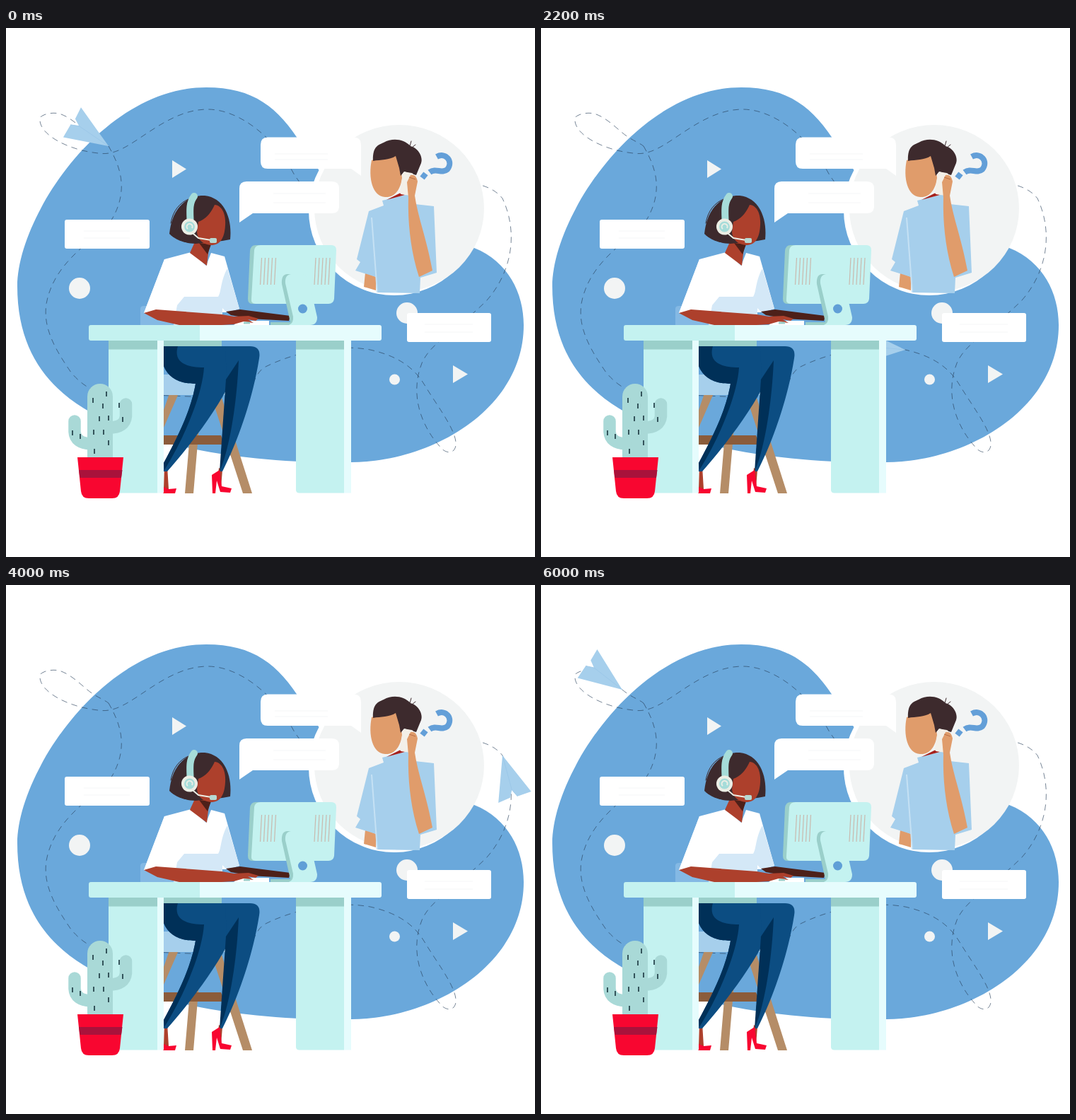
Write an HTML page that moves like this. It is 748 px wide and 748 px high and loops after 6.1 s.

```html
<!DOCTYPE html>
<html lang="en">
<head>
<meta charset="utf-8">
<title>Customer support</title>
<style>
  html, body { margin: 0; height: 100%; overflow: hidden; background: #fff; }
  svg { display: block; width: 100vw; height: 100vh; }
  .blue { fill: #6aa8db } .sky { fill: #a6cfec } .mint { fill: #c4f2f0 } .ice { fill: #e6fcfd }
  .teal { fill: #9acfca } .white { fill: #fff } .mist { fill: #f2f4f4 } .hair { fill: #3d2a2d }
  .tan { fill: #e09c6b } .skin { fill: #ad402c } .dark { fill: #4d2019 } .red { fill: #f80630 }
  .denim { fill: #0c4d82 } .navy { fill: #003058 } .wood { fill: #b58d67 } .cactus { fill: #a9d9d7 }
  .line { fill: none; stroke-linecap: round; stroke-linejoin: round }
</style>
</head>
<body>
<svg viewBox="0 0 748 748">
  <path class="blue" d="M16 365C16 268 136 84 283 84C350 84 385 112 418 165C460 235 510 270 570 285C610 290 640 300 662 311C710 330 732 375 732 420C732 540 600 614 488 614C400 616 300 606 235 588C150 562 16 525 16 365Z"/>
  <path id="route" fill="none" stroke="#263e58" stroke-width=".8" stroke-opacity=".8" stroke-dasharray="8.500 6.500"/>

  <g class="mist">
    <path d="M235 187V212L255 199.500ZM632 477V502L653 489.500Z"/>
    <circle cx="104" cy="368" r="15"/>
    <circle cx="567" cy="403" r="15"/>
    <circle cx="549.500" cy="497" r="7.500"/>
  </g>
  <g class="white">
    <rect x="83" y="271" width="120" height="41" rx="3"/>
    <rect x="567" y="403" width="119" height="41" rx="3"/>
  </g>

  <g id="plane">
    <path class="sky" d="M0 0L-62.500-24.500L-60.500-6.500L-50.500-1L-61.500 4L-60.500 24.500Z"/>
    <path d="M0 0L-50.500-1L-61.500 4" fill="none" stroke="#9ac6e8" stroke-width=".8"/>
  </g>

  <!-- caller -->
  <ellipse class="white" cx="549" cy="258" rx="121" ry="120"/>
  <ellipse class="mist" cx="556" cy="255" rx="120" ry="118"/>
  <path class="tan" d="M508 346L523 352V371L506 366Z"/>
  <path class="sky" d="M532 244L573 234L578 249L605 252L609 346L586 353L585 375L525 374L523 352L494 343L501 331L496 327L513 259L534 251Z"/>
  <path d="M517 268L525 374" stroke="#c5e1f4" stroke-width="2"/>
  <path d="M538 243L560 232L564 236Z" fill="#a5201c"/>
  <path class="tan" d="M522 185L556 180L560 212C558 228 550 240 536 239C518 238 512 212 517 187Z"/>
  <path class="hair" d="M519 188C518 166 528 165 534 162C547 155 562 157 572 167C584 170 590 184 587 191L580 208L563 203L558 209L556 198L551 181C542 187 530 186 519 188Z"/>
  <path class="line" d="M571 167L573 160M574 169L579 165" stroke="#3d2a2d"/>
  <rect x="559" y="204" width="15" height="32" rx="3" fill="#f3efe8" transform="rotate(9 566 220)"/>
  <path class="tan" d="M567 218L572 208Q580 206 582 217L578 237C583 270 594 295 603 343L584 352C572 315 568 275 569 240Z"/>
  <path d="M570 211L579 214" stroke="#b96e45"/>
  <path d="M609 182C622 175 633 189 624 200C616 207 608 197 599 204" fill="none" stroke="#639fd8" stroke-width="8"/>
  <rect x="587" y="205" width="8" height="8" fill="#639fd8" transform="rotate(38 591 209)"/>

  <!-- speech bubbles -->
  <path class="white" d="M370 154.500H492Q502 154.500 502 165V209L488 199H370Q360 199 360 189V165Q360 154.500 370 154.500ZM340 217H461Q471 217 471 227V252Q471 262 461 262H349L330 275V227Q330 217 340 217Z"/>
  <path d="M380 178H455M380 186H455M378 234H452M378 247H452M110 287H175M110 297H175M592 419H660M592 430H660" stroke="#f5f6f7"/>

  <!-- chair -->
  <path class="wood" d="M231 517H244L223 565V540ZM263 540H275L265 658H253ZM289 517H303L348 658H335Z"/>
  <path d="M223 576H304L309 589H223Z" fill="#8b5c3b"/>
  <path class="sky" d="M223 490H318V513Q317 519 309 519H223Z"/>
  <path d="M190 397Q190 393 195 393H303L307 420H190Z" fill="#84b9e4"/>

  <!-- legs -->
  <path class="skin" d="M224 620H228L230 652H223ZM301 622L306 625L304 650L299 640Z"/>
  <path class="red" d="M223 649L230 652L241 651L239 658H222ZM291 632L302 625L305 648L319 651L317 657L303 656L298 640L296 658H292Z"/>
  <path class="denim" d="M223 450H345L324 487C300 540 260 590 228 627H223V615C242 580 262 540 268 503C245 503 230 495 223 478Z"/>
  <path class="navy" d="M223 450H243C237 470 250 480 280 480C278 515 255 575 224 625L223 615C242 580 262 540 268 503C245 503 230 495 223 478Z"/>
  <path class="denim" d="M312 494L303 627H306C325 590 348 530 358 467Q361 450 345 450H310Z"/>
  <path class="navy" d="M329 470L311 497L302 627C314 600 326 540 329 470Z"/>

  <!-- desk -->
  <path class="mint" d="M145 442H214V657.500H149Q145 657 145 653ZM410 442H478V657.500H414Q410 657 410 653Z"/>
  <path class="ice" d="M214 442H223V657.500H214ZM478 442H488V657.500H478Z"/>
  <path class="teal" d="M145 442H214V454.500H145ZM410 442H478V454.500H410ZM223 442H305V450H223Z"/>
  <path class="mint" d="M120 420H276V442H120Q117 442 117 439V423Q117 420 120 420Z"/>
  <path class="ice" d="M274 420H528Q531 420 531 423V439Q531 442 528 442H274Z"/>

  <!-- agent -->
  <path class="white" d="M224 327L262 317L283 336L290 318L309 323L330 397L312 402L235 402L195 403Z"/>
  <path d="M313 340L330 397L312 402L306 396V420H237L242 392L252 380H300C305 372 303 358 313 340Z" fill="#d4e8f7"/>
  <path class="white" d="M224 327L248 330L240 382L231 401L195 403Z"/>
  <path class="dark" d="M311 401L331 398L402 407L400 414L345 411L318 406Z"/>
  <path class="skin" d="M260 318L270 296L288 304L286 319L284 336Z"/>
  <path class="dark" d="M273 304L290 306L285 320Z"/>
  <path class="hair" d="M231 291C235 252 258 236 281 237C308 240 320 268 317 299L306 301L268 305C250 304 239 299 231 291Z"/>
  <path class="skin" d="M272 274C284 270 291 259 295 250C306 251 311 264 310 279C309 297 303 307 290 307C277 306 271 298 270 289Z"/>
  <path class="line" d="M233 276C236 258 246 247 258 242" stroke="#3d2a2d"/>
  <path class="line" d="M266 238C259 247 260 258 260.500 271" stroke="#a6dcd9" stroke-width="10" stroke-linecap="butt"/>
  <circle cx="259.500" cy="281" r="11.500" fill="#eceee5"/>
  <circle cx="259.500" cy="281" r="7.500" fill="#a6dcd9"/>
  <path d="M257 284A4 4 0 1 1 263 283" fill="none" stroke="#eceee5" stroke-width="2"/>
  <path class="line" d="M265 291L272 297L290 300" stroke="#eceee5" stroke-width="2"/>
  <rect x="288" y="297" width="10" height="7" rx="2" fill="#b6d9d3"/>

  <!-- monitor and keyboard -->
  <path class="teal" d="M353 307H372V390H348Q342 390 342 383L345 315Q346 307 353 307Z"/>
  <path class="mint" d="M360 307H460Q467 307 467 314L464 383Q463 390 456 390H353Q346 390 347 383L351 314Q352 307 360 307Z"/>
  <g id="vents" stroke="#c8b9ae" stroke-width="1.200"></g>
  <path class="teal" d="M398 348H412V420H374V416H402L390 362Q389 348 398 348Z"/>
  <path class="mint" d="M403 348H419Q426 348 428 356L440 409Q440 420 430 420H400Q407 417 406 408L395 361Q394 349 403 348Z"/>
  <circle cx="419.500" cy="397" r="6.500" fill="#609fd7"/>
  <path class="white" d="M322 420L329 414H372V420Z"/>
  <path class="skin" d="M195 403L212 398L305 405L322 408L343 407L357 411L353 414L342 412L350 417L336 415L322 419L305 420H245L214 413Z"/>
  <path d="M336 417H345" stroke="#9acfca" stroke-width="3"/>

  <!-- cactus -->
  <path class="cactus" d="M115 607V521A18 18 0 0 1 151 521V607Z"/>
  <path class="line" d="M97 556V571Q98 587 120 588M169.500 532V549Q168 565 146 565" stroke="#a9d9d7" stroke-width="17.500"/>
  <g id="spines" stroke="#17333c" stroke-width="1.600"></g>
  <path class="red" d="M101 607H166L161 655Q160 665 150 665H117Q107 665 106 655Z"/>
  <path d="M103 625H164.500L163 636H104.500Z" fill="#a9123b"/>
</svg>
<script>
  const get = id => document.getElementById(id);
  const strokes = (id, points, dx, length) => get(id).innerHTML =
    points.map(([x, y]) => `<path d="M${x} ${y}l${dx} ${length}"/>`).join("");

  strokes("vents", [0, 1, 2, 3, 4].flatMap(i => [[361.5 + i * 5, 325], [438 + i * 5, 325]]), -2, 38);
  strokes("spines", [[123, 523], [142, 514], [137, 531], [132, 549], [145, 548], [160, 530], [165, 550],
    [94, 569], [105, 574], [124, 568], [138, 568], [145, 583], [125, 595]], 0, 7);

  // Flight legs: arrival time in ms and the curve flown until then
  const legs = [
    [1100, "C158 190 176 225 150 270C120 305 68 330 57 390C52 425 70 455 92 487"],
    [2200, "C108 506 125 516 150 518C230 518 290 525 335 520C350 512 350 490 365 480C400 462 460 445 515 455"],
    [3200, "C560 465 580 485 592 505C610 535 638 570 636 590C634 604 620 602 612 590C594 570 568 525 588 474"],
    [4000, "C600 445 640 425 680 385C715 345 725 290 702 241"],
    [4300, "C695 232 685 226 671 222C650 213 630 210 612 210"],
    [4700, "C550 215 500 300 440 250C430 240 418 222 408 208"],
    [5300, "C380 155 330 115 285 115C250 115 220 135 193 153"],
    [6100, "C165 172 150 180 130 177C85 172 48 150 48 130C45 125 60 118 75 121C95 127 110 146 123 154C132 160 140 163 145 167"]
  ];
  const LOOP = 6100, STEP = 100, CHORD = 40;
  const route = get("route"), plane = get("plane");

  let d = "M145 167";
  const stops = [[0, 0]];
  for (const [time, curve] of legs) {
    route.setAttribute("d", d += curve);
    stops.push([time, route.getTotalLength()]);
  }
  const total = route.getTotalLength();
  const at = s => route.getPointAtLength((s + total) % total);

  function draw(now) {
    const t = Math.floor(now % LOOP / STEP) * STEP;
    const i = stops.findIndex(([time]) => time > t);
    const [t0, s0] = stops[i - 1], [t1, s1] = stops[i];
    const s = s0 + (s1 - s0) * (t - t0) / (t1 - t0);
    const tip = at(s), back = at(s - CHORD);
    const angle = Math.atan2(tip.y - back.y, tip.x - back.x) * 180 / Math.PI;
    plane.setAttribute("transform", `translate(${tip.x} ${tip.y}) rotate(${angle})`);
  }

  const start = performance.now();
  (function tick() {
    draw(performance.now() - start);
    requestAnimationFrame(tick);
  })();
</script>
</body>
</html>
```
